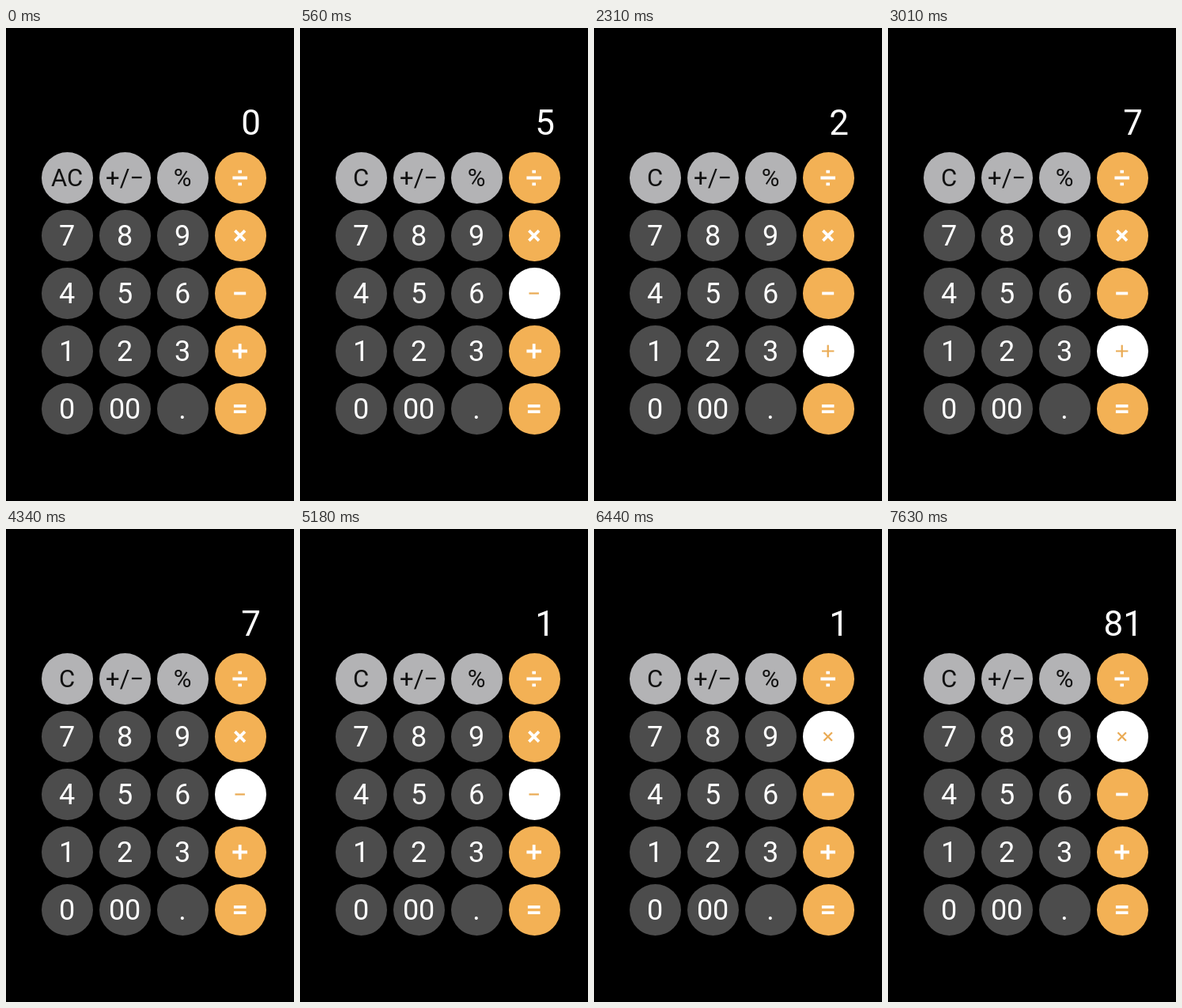
Recreate the animation shown at these times as an HTML page. Size 364 by 598 pixels, loop 8 s.

```html
<!DOCTYPE html>
<html lang="en">
<head>
<meta charset="utf-8">
<title>Calculator</title>
<style>
  html, body { margin: 0; width: 100%; height: 100%; overflow: hidden; background: #000; }
  svg { display: block; width: 100%; height: 100%; }
  text { font-family: Roboto, Arial, sans-serif; text-anchor: middle; fill: #fff; }
  .digit circle { fill: #4c4c4c; }
  .digit text { font-size: 36px; }
  .util circle { fill: #b3b3b5; }
  .util text { font-size: 31px; fill: #111; }
  .op circle { fill: #f3b155; }
  .op path { stroke: #fff; stroke-width: 3.8; fill: none; }
  .op.active circle { fill: #fff; }
  .op.active path { stroke: #eaab55; stroke-width: 2.7; }
  #display { font-size: 44px; text-anchor: end; }
</style>
</head>
<body>
<svg id="stage" viewBox="0 0 364 598">
  <rect width="364" height="598"/>
  <text id="display" x="322" y="134.7">0</text>
</svg>
<script>
const LOOP = 8000;
const stage = document.getElementById('stage');
const display = document.getElementById('display');

const keypad = [
  ['AC', '+/−', '%', '÷'],
  ['7', '8', '9', '×'],
  ['4', '5', '6', '−'],
  ['1', '2', '3', '+'],
  ['0', '00', '.', '='],
];

// Operator strokes, relative to the glyph centre.
const signs = {
  '÷': 'M-9.3 0H9.3M-2.3 -7.8H2.3M-2.3 7.8H2.3',
  '×': 'M-6.3 -6.3L6.3 6.3M-6.3 6.3L6.3 -6.3',
  '−': 'M-7.5 0H7.5',
  '+': 'M-9.3 0H9.3M0 -9.3V9.3',
  '=': 'M-7.8 -3.6H7.8M-7.8 3.6H7.8',
};

// (5 - 2 + 7 - 1) × 9 = 81
const presses = [
  { at: 0, value: '0', op: '' },
  { at: 70, value: '5' },
  { at: 420, op: '−' },
  { at: 840, value: '2' },
  { at: 2170, op: '+' },
  { at: 2660, value: '7' },
  { at: 4340, op: '−' },
  { at: 4760, value: '1' },
  { at: 6300, op: '×' },
  { at: 6720, value: '9' },
  { at: 7630, value: '81' },
];

function add(parent, tag, attributes) {
  const node = document.createElementNS('http://www.w3.org/2000/svg', tag);
  for (const name in attributes) node.setAttribute(name, attributes[name]);
  return parent.appendChild(node);
}

const keys = {};
keypad.forEach((row, r) => row.forEach((label, c) => {
  const kind = c === 3 ? 'op' : r === 0 ? 'util' : 'digit';
  const key = add(stage, 'g', {
    class: kind,
    transform: `translate(${77.5 + 73 * c} ${189.5 + 73 * r})`,
  });
  add(key, 'circle', { r: 32.5 });
  if (kind === 'op') {
    add(key, 'path', { d: signs[label], transform: `translate(-.8 ${r ? 0 : -.2})` });
    // Smaller sign while highlighted
    key.sign = key.lastChild;
  } else {
    add(key, 'text', { x: -.4, y: kind === 'util' ? 10.8 : 12.9 }).textContent = label;
  }
  keys[label] = key;
}));

function render(time) {
  const state = {};
  for (const press of presses) if (press.at <= time) Object.assign(state, press);
  display.textContent = state.value;
  keys.AC.lastChild.textContent = state.value === '0' ? 'AC' : 'C';
  for (const label in signs) {
    const active = label === state.op;
    keys[label].classList.toggle('active', active);
    keys[label].sign.setAttribute('transform', `translate(-.8 0) scale(${active ? .83 : 1})`);
  }
}

const start = performance.now();
function tick() {
  render((performance.now() - start) % LOOP);
  requestAnimationFrame(tick);
}
tick();
</script>
</body>
</html>
```
